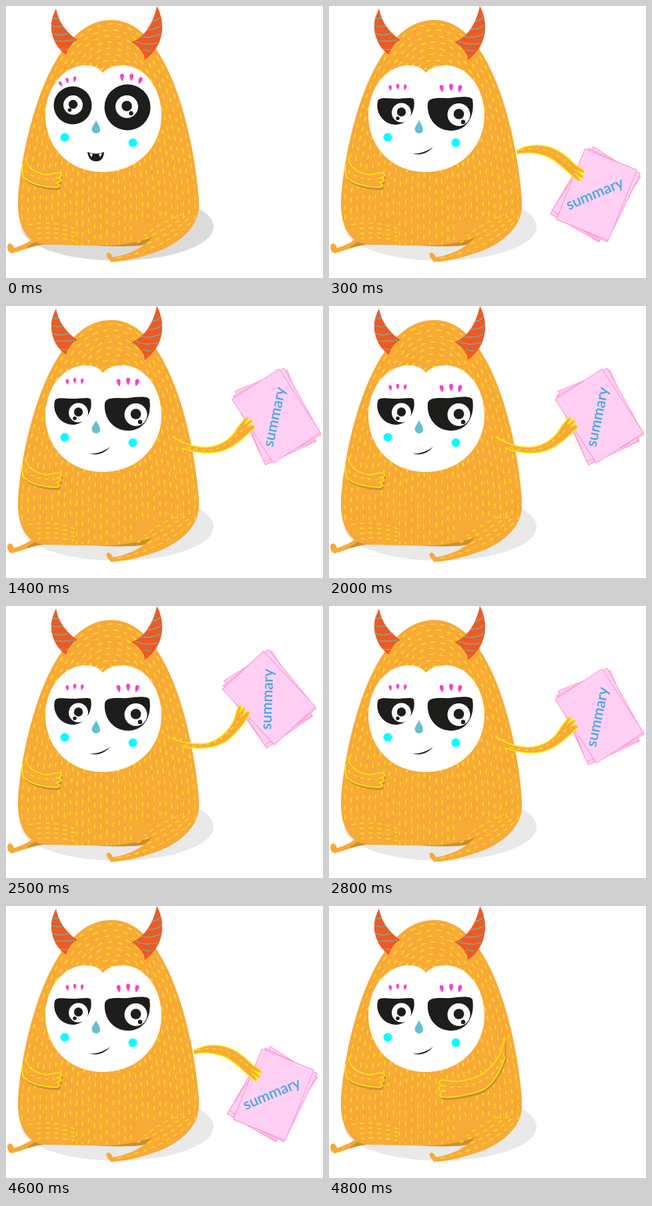
These frames come from a looping animation (475x408 px, 5800 ms). An HTML page:

```html
<!DOCTYPE html>
<html lang="en">
<head>
<meta charset="utf-8">
<title>Furry monster with a summary</title>
<style>
html, body { margin: 0; width: 100%; height: 100%; overflow: hidden; background: #fff; }
svg { display: block; width: 475px; height: 408px; }
.fur { fill: #f8aa37; }
.hair { fill: none; stroke: #fee31a; stroke-width: 1.5; stroke-linecap: round; }
.dark { fill: #cb8f30; }
.ink { fill: #1d1d1b; }
.horn { fill: #ee5a24; }
.ring { fill: none; stroke: #4fc4bf; stroke-width: 1.2; }
.limb { fill: #f8aa37; stroke: #fbea0f; stroke-width: 1.6; stroke-linejoin: round; stroke-linecap: round; }
.sheet { fill: #ffd0f4; stroke: #ff93cb; }
text { font: 600 22.5px Lato, "Open Sans", sans-serif; fill: #45a7ea; text-anchor: middle; }
</style>
</head>
<body>
<svg viewBox="0 0 475 408">
  <defs>
    <path id="body" d="M18 290C24 200 66 20 158 21C244 20 283 200 289 290C291 325 262 350 230 357L160 360L60 358C38 357 16 340 18 290Z"/>
    <path id="leg" d="M150.500 372C152 368 158 370 160 377C185 373 205 362 217 349C240 330 270 310 289 298C290 330 262 353 235 365C210 375 180 383 157 384C156 380 150 378 150.500 372Z"/>
    <path id="petal" d="M0 5.500C-2 2-3-.5-2.700-2.500C-2.300-6 2.300-6 2.700-2.500C3-.5 2 2 0 5.500Z" fill="#f93fd3"/>
    <clipPath id="inside"><use href="#body"/><use href="#leg"/></clipPath>
  </defs>

  <ellipse id="ground" cx="167" cy="331" rx="144" ry="51"/>
  <path class="fur" d="M2 361C3 354 10 355 12 363C25 359 35 354 45 346L64 357C42 359 25 366 9 371C4 370 2 365 2 361Z"/>
  <path class="dark" d="M32 361L46 352L62 357C50 358 42 360 32 363Z"/>
  <use href="#body" class="fur"/>
  <path class="dark" d="M135 359.500C170 360 195 356 222 346L208 358C195 361 165 361 135 359.500Z"/>
  <use href="#leg" class="fur"/>
  <g id="coat" class="hair" clip-path="url(#inside)"></g>

  <path class="horn" d="M75 4C78 22 90 40 107 51C99 55 92 64 90 73C76 64 66 45 68 25C69 17 72 10 75 4Z"/>
  <path class="ring" d="M69 17Q74 20 79 18M68 29Q76 33 85 30M69 41Q81 46 93 41M73 52Q87 54 103 51M81 64Q86 66 92 65"/>
  <path class="horn" d="M226 0C238 22 240 58 208 81C207 70 199 60 188 54C208 47 221 25 226 0Z"/>
  <path class="ring" d="M219 23Q226 22 231 17M212 35Q224 36 233 29M202 46Q216 49 232 42M194 53Q210 60 228 55M205 65Q211 68 217 67"/>

  <path fill="#fff" d="M145 100C139 92 130 89 118 89C84 90 59 125 59 165C60 213 95 249 145 249C195 249 233 213 233 163C232 122 208 90 176 89C162 89 151 93 145 100Z"/>
  <g id="wide">
    <circle class="ink" cx="100" cy="149" r="28.500"/>
    <circle class="ink" cx="182" cy="152" r="34.500"/>
    <path class="ink" d="M122 219Q135 224 147 219Q146 233 135 233Q124 233 122 219Z"/>
    <path fill="#fff" d="M125 221L130 222L128 227ZM139 222L144 221L141 227Z"/>
  </g>
  <g id="sly">
    <path class="ink" d="M73 143C75 136 85 139 99 139S124 136 127 140C131 158 118 178 100 178C82 178 69 160 73 143Z"/>
    <path class="ink" d="M148 146C150 135 170 139 182 138S211 134 215 140C219 165 207 187 183 187C160 187 146 167 148 146Z"/>
    <path class="ink" d="M125 221.500C138 225 149 220 156 211C148 217.500 138 222 125 221.500Z"/>
  </g>
  <g id="eyes"></g>
  <g id="brows"></g>
  <path fill="#64c0cf" d="M135 171C137 177 141 180 141 185C141 189 138 191 135 191C131 191 128.500 188 128.500 184C129 180 133 177 135 171Z"/>
  <g fill="#0ff"><circle cx="88" cy="197" r="6.500"/><circle cx="190" cy="205" r="6.500"/></g>

  <g id="left"></g>
  <g id="paper"></g>
  <g id="right"></g>
</svg>
<script>
const $ = id => document.getElementById(id);
const show = (id, on) => $(id).setAttribute('visibility', on ? 'visible' : 'hidden');
const dashed = (d, gap = '6 9', shift = 0) =>
  `<path class="hair" d="${d}" stroke-dasharray="${gap}" stroke-dashoffset="${shift}"/>`;

// Nested arches that follow the body outline, broken into hairs.
function coat() {
  let out = '';
  for (let d = 6, i = 0; d < 134; d += 9, i++) {
    const x = v => 156 + (v - 156) * (1 - d / 137);
    const left = x(18), right = x(289);
    const top = 21 + d, low = 200 + d / 3;
    out += dashed(`M${left} ${left < 98 ? 320 : 357}V290C${x(24)} ${low} ${x(66)} ${top} 158 ${top}` +
      `C${x(244)} ${top} ${x(283)} ${low} ${right} 290V${right > 195 ? 320 : 357}`,
      `6 ${9 + i % 3} 5 ${11 - i % 2}`, i * i * 5 % 31);
  }
  for (let i = 0; i < 4; i++) {
    out += dashed(`M${34 + i * 5} ${328 + i * 7}Q70 ${321 + i * 8} 102 ${334 + i * 6}`, '5 8', i * 5);
    out += dashed(`M${168 + i * 13} ${378 - i * 11}Q${238 - i * 4} ${364 - i * 12} ${280 - i * 6} ${322 - i * 3}`, '5 8', i * 5);
  }
  return out;
}

const limb = (d, line, shadow) =>
  (shadow ? `<path class="dark" d="${d}" transform="translate(2 4)"/>` : '') +
  `<path class="limb" d="${d}"/>` + dashed(line, '4 7');

const rest = {
  shadow: true,
  d: 'M263 197C260 222 245 247 220 257C205 262 190 265 177 262C170 260 163 262 165 266C166 269 170 270 175 270C168 268 162 273 165 276C167 279 171 277 175 277C168 277 164 283 168 286C180 289 215 283 232 275C248 265 258 245 264 226',
  line: 'M182 272Q225 271 244 252T261 218'
};
const raised = {
  sheet: [405, 165, -33],
  d: 'M250 196C262 204 280 212 300 212C322 211 338 198 345 186C350 177 355 172 360 167C363 165 364 168 358 177C365 171 370 169 369 173L362 181C369 177 374 179 372 183C360 194 345 210 325 217C305 224 280 219 264 213',
  line: 'M272 212Q310 224 334 204T358 181'
};
const high = {
  sheet: [394, 138, -43],
  d: 'M249 198C262 205 280 208 300 206C322 201 336 184 342 170C345 160 346 153 350 149C353 147 353 151 350 160C355 152 358 150 358 154L355 164C360 157 366 156 365 161C360 172 345 192 330 203C312 214 288 215 264 211',
  line: 'M268 209Q306 214 329 193T352 163'
};
const mid = {
  sheet: [401, 283, 22],
  d: 'M281 217C295 209 312 207 328 211C350 217 362 232 370 239C376 242 381 245 383 249C383 252 378 250 372 247C378 252 383 256 380 258C377 258 373 254 369 251C374 257 378 261 375 263C368 260 352 242 338 232C322 221 300 218 282 222',
  line: 'M288 216Q320 209 344 226T370 248'
};
const low = {
  sheet: [388, 362, 62],
  d: 'M281 220C297 217 313 223 325 236C339 252 341 273 345 289C349 294 351 300 350 305C347 307 345 301 343 297C345 304 346 310 342 311C339 309 339 303 338 299C338 305 337 311 333 310C330 300 330 274 319 253C309 237 297 229 283 227',
  line: 'M288 224Q315 230 328 255T339 296'
};
const none = { d: '', line: '' };

const steps = [[0, none], [200, low], [300, mid], [400, raised], [2500, high], [2600, raised],
  [2700, high], [2800, raised], [4600, mid], [4700, low], [4800, rest]];
const lifts = [1400, 1800, 3800, 4200];

const eye = (x, y, r, dx, dy) =>
  `<circle cx="${x}" cy="${y}" r="${r}" fill="#fff"/>` +
  `<circle class="ink" cx="${x}" cy="${y - 1}" r="${r * .46}"/>` +
  `<circle class="ink" cx="${x + dx}" cy="${y + dy}" r="${r * .19}"/>`;
const petals = list => list.map(([x, y, turn], i) =>
  `<use href="#petal" transform="translate(${x} ${y}) rotate(${turn}) scale(${i < 3 ? .83 : 1.08})"/>`).join('');

const sheet = (x, y, turn) =>
  `<rect class="sheet" x="-42" y="-57" width="84" height="114" transform="translate(${x} ${y}) rotate(${turn})"/>`;
const openBrows = [[82, 117, -30], [92, 112, -14], [103, 110, 4], [174, 107, -4], [188, 107, 6], [201, 112, 20]];
const slyBrows = [[92, 123, -10], [103, 121, 0], [114, 122, 10], [169, 124, -10], [183, 122, 0], [196, 124, 14]];

$('coat').innerHTML = coat();
$('left').innerHTML = limb('M29 227C31 240 38 249 60 253C68 254 74 248 82 251C86 255 80 258 75 258C84 256 85 264 75 265C82 265 81 273 74 272C60 272 35 268 26 256C24 250 24 242 25 238',
  'M29 247Q40 260 72 260', true);
$('paper').innerHTML = sheet(-4, 2, 8) + sheet(-1, -1, 11) + sheet(3, 0, 4) + sheet(0, 0, 0) +
  '<text transform="rotate(-45)" x="-2" y="5">summary</text>';

let pose, face;
function setPose(p) {
  if (p === pose) return;
  pose = p;
  $('right').innerHTML = limb(p.d, p.line, p.shadow);
  show('paper', p.sheet);
  if (p.sheet) {
    const [x, y, turn] = p.sheet;
    $('paper').setAttribute('transform', `translate(${x} ${y}) rotate(${turn})`);
  }
}
function setFace(f) {
  if (f === face) return;
  face = f;
  const open = f === 'open';
  show('wide', open);
  show('sly', !open);
  $('ground').setAttribute('fill', open ? '#dbdbdb' : '#e9e9e9');
  $('eyes').innerHTML = open
    ? eye(100.500, 148.500, 14.500, -5, 7.500) + eye(181, 151, 17, 6.500, 10)
    : eye(108.500, 160, 14.500, -5.500, 8.500) + eye(194.500, 163, 17, 6.500, 11);
  const lift = f === 'lifted' ? 9 : 0;
  $('brows').innerHTML = petals(open ? openBrows : slyBrows.map(([x, y, turn]) => [x, y - lift, turn]));
}

function draw(now) {
  const t = now % 5800;
  setPose(steps.filter(s => s[0] <= t).pop()[1]);
  setFace(t < 200 ? 'open' : lifts.some(s => t >= s && t < s + 200) ? 'lifted' : 'sly');
  requestAnimationFrame(() => draw(performance.now() - start));
}
const start = performance.now();
draw(0);
</script>
</body>
</html>
```
